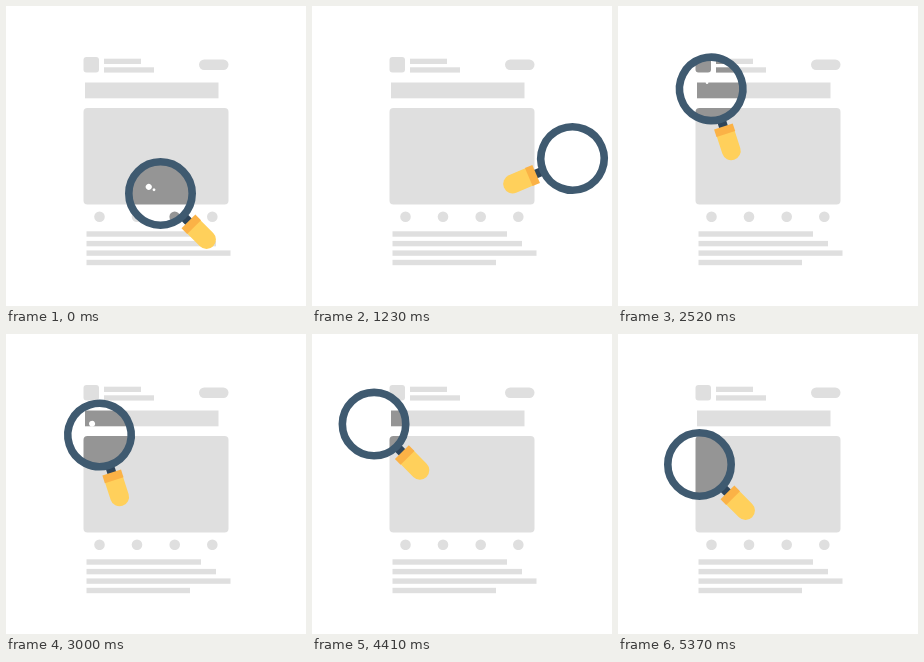
An HTML page for the animation above (5400 ms loop, 300x300 px).

```html
<!DOCTYPE html>
<html lang="en">
<head>
<meta charset="utf-8">
<title>Page search</title>
<style>
  html, body { margin: 0; width: 100%; height: 100%; overflow: hidden; background: #fff; }
  svg { display: block; width: 100vw; height: 100vh; }
</style>
</head>
<body>
<svg viewBox="0 0 300 300">
  <defs>
    <g id="page">
      <rect x="77.5" y="51" width="15.5" height="15.5" rx="3"/>
      <rect x="98" y="52.7" width="37" height="5.3"/>
      <rect x="98" y="61.3" width="50" height="5.3"/>
      <rect x="193" y="53.5" width="29.5" height="10.4" rx="5.2"/>
      <rect x="79" y="76.5" width="133.5" height="15.8"/>
      <rect x="77.5" y="102" width="145" height="96.5" rx="4"/>
      <circle cx="93.5" cy="210.8" r="5.3"/>
      <circle cx="131" cy="210.8" r="5.3"/>
      <circle cx="168.7" cy="210.8" r="5.3"/>
      <circle cx="206.3" cy="210.8" r="5.3"/>
      <rect x="80.5" y="225.3" width="114.5" height="5.4"/>
      <rect x="80.5" y="234.9" width="129.5" height="5.4"/>
      <rect x="80.5" y="244.4" width="144" height="5.4"/>
      <rect x="80.5" y="253.8" width="103.5" height="5.4"/>
    </g>
    <clipPath id="lens"><circle id="hole" r="30"/></clipPath>
  </defs>
  <use href="#page" fill="#dfdfdf"/>
  <g clip-path="url(#lens)">
    <rect width="300" height="300" fill="#fff"/>
    <use href="#page" fill="#959595"/>
  </g>
  <!-- drawn with the handle along +x -->
  <g id="glass">
    <circle cx="-13" cy="3.6" r="3" fill="#fff"/>
    <circle cx="-7.2" cy="2" r="1.4" fill="#fff"/>
    <rect x="33" y="-4.5" width="9" height="9" fill="#2f455a"/>
    <path d="M46-9.4H65.2A9.3 9.4 0 0 1 65.2 9.4H46Z" fill="#ffd05b"/>
    <rect x="39.5" y="-9.8" width="8" height="19.6" fill="#fbb246"/>
    <circle r="31.7" fill="none" stroke="#3f5a70" stroke-width="7.6"/>
  </g>
</svg>
<script>
const LOOP = 5400;
const glass = document.getElementById('glass');
const hole = document.getElementById('hole');

// Bezier ease (x1, 0, x2, 1)
function ease(u, x1, x2) {
  let lo = 0, hi = 1;
  for (let i = 0; i < 24; i++) {
    const s = (lo + hi) / 2, r = 1 - s;
    if (3 * r * r * s * x1 + 3 * r * s * s * x2 + s * s * s < u) lo = s; else hi = s;
  }
  return lo * lo * (3 - 2 * lo);
}

// start, end, ease x1, ease x2, path of the lens centre
const moves = [
  [0, 570, .33, .67, 'M154.5 187.5C150 140 158 61 179.5 58.5'],
  [570, 1230, .37, .82, 'M179.5 58.5C214 68 247 118 260.5 152.5'],
  [1450, 2070, .33, .67, 'M260.5 152.5C205 126 149 59 93 73.5'],
  [2285, 3000, .33, .45, 'M93 73.5L93.5 101'],
  [3285, 3870, .33, .67, 'M93.5 101C81.5 83 98 56 111.5 48.5'],
  [3870, 5385, .1, .35, 'M111.5 48.5C38 82.5 63 100 81.5 130.5']
].map(([start, end, x1, x2, d]) => {
  const path = document.createElementNS('http://www.w3.org/2000/svg', 'path');
  path.setAttribute('d', d);
  return { start, end, x1, x2, path, length: path.getTotalLength() };
});

// handle angle in degrees
const turns = [
  { start: 0, end: 1230, x1: .05, x2: 1, from: 45, to: 157 },
  { start: 1450, end: 2070, x1: .33, x2: .75, from: 157, to: 72 },
  { start: 3870, end: 4440, x1: .33, x2: .67, from: 72, to: 45 }
];

const activeAt = (list, t) => list.filter(k => k.start <= t).pop();
const progress = (k, t) => t >= k.end ? 1 : ease((t - k.start) / (k.end - k.start), k.x1, k.x2);

function draw() {
  const t = performance.now() % LOOP;
  const move = activeAt(moves, t), turn = activeAt(turns, t);
  const { x, y } = move.path.getPointAtLength(move.length * progress(move, t));
  const angle = turn.from + (turn.to - turn.from) * progress(turn, t);
  glass.setAttribute('transform', `translate(${x} ${y}) rotate(${angle})`);
  hole.setAttribute('cx', x);
  hole.setAttribute('cy', y);
  requestAnimationFrame(draw);
}
draw();
</script>
</body>
</html>
```
